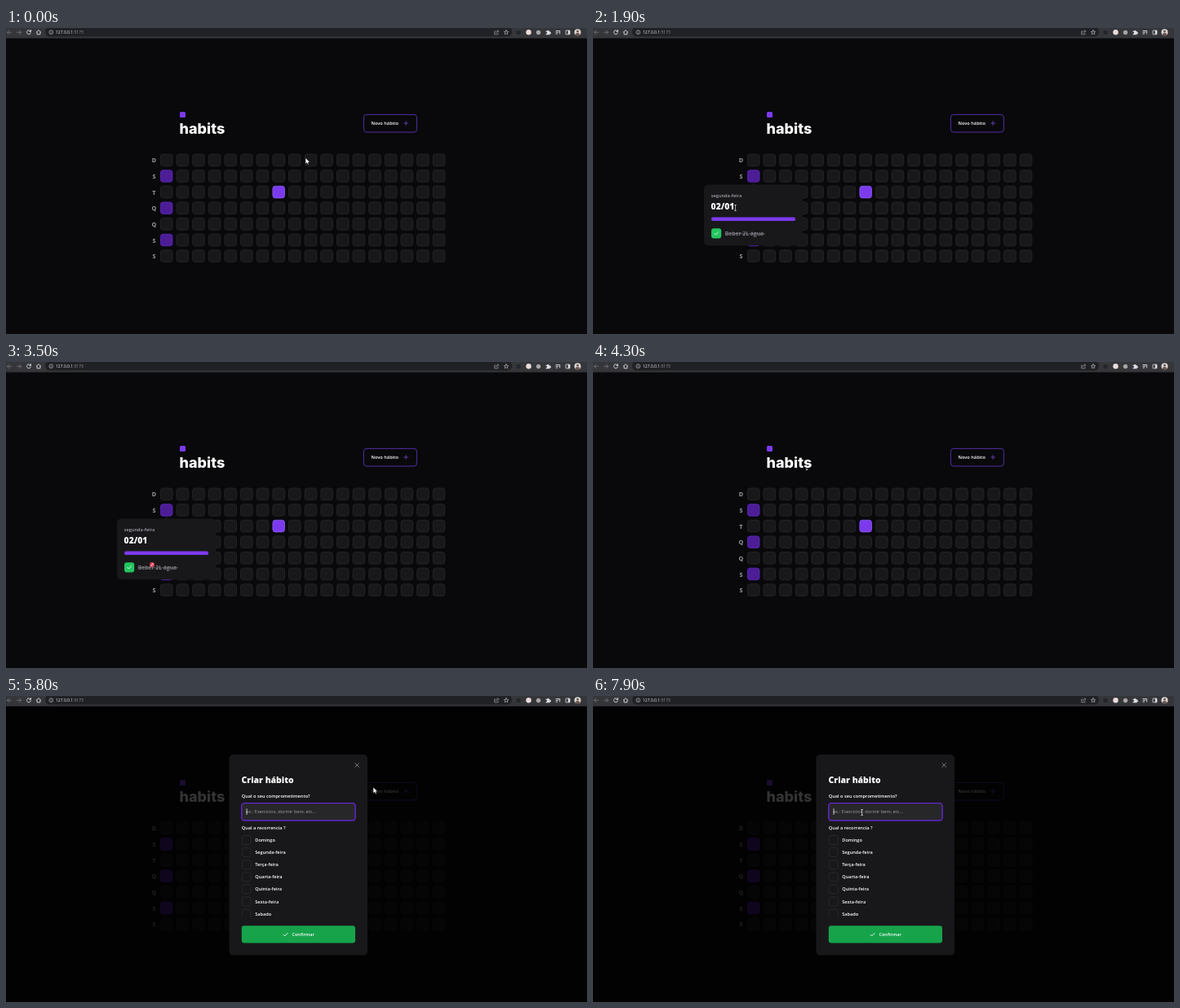
An HTML page that plays this animation: 712x376 px, repeating every 8000 ms.

```html
<!DOCTYPE html>
<html lang="pt">
<head>
<meta charset="utf-8">
<title>habits</title>
<style>
html, body { margin: 0; width: 100%; height: 100%; overflow: hidden; background: #09090b; }
svg { display: block; width: 712px; height: 376px; font-family: "Open Sans", sans-serif; }
text { white-space: pre; }
</style>
</head>
<body>
<svg id="stage" viewBox="0 0 712 376"></svg>
<script>
const text = (x, y, size, weight, fill, str, extra = '') =>
  `<text x="${x}" y="${y}" font-size="${size}" font-weight="${weight}" fill="${fill}" ${extra}>${str}</text>`;
const box = (x, y, w, h, r, fill, stroke = 'none', sw = 0.8, id = '') =>
  `<rect x="${x}" y="${y}" width="${w}" height="${h}" rx="${r}" fill="${fill}" stroke="${stroke}" stroke-width="${sw}" id="${id}"/>`;
const line = (d, stroke, sw = 0.9) =>
  `<path d="${d}" fill="none" stroke="${stroke}" stroke-width="${sw}" stroke-linecap="round" stroke-linejoin="round"/>`;
const dot = (x, y, r, fill, stroke = 'none') =>
  `<circle cx="${x}" cy="${y}" r="${r}" fill="${fill}" stroke="${stroke}" stroke-width=".7"/>`;
const group = (id, body) => `<g id="${id}">${body}</g>`;

function browserBar() {
  const light = '#dcdde0', dim = '#77797d';
  return box(0, 0, 712, 12.6, 0, '#35363a') +
    box(48, -1, 572, 11.6, 5.5, '#202124') +
    line('M6.5 5.3H1.5M3.7 3L1.4 5.3L3.7 7.6', dim, 0.8) +
    line('M13.5 5.3H18.5M16.3 3L18.6 5.3L16.3 7.6', dim, 0.8) +
    line('M30 3.7A2.5 2.5 0 1 0 30.4 6M30.5 2.6V4.4H28.7', light) +
    line('M37.3 5.2L40 2.7L42.7 5.2M38.1 5V7.8H41.9V5', light) +
    dot(55.3, 5.2, 2.4, 'none', '#b5b7ba') + line('M55.3 5V6.5M55.3 3.8V3.9', '#b5b7ba', 0.6) +
    text(61, 7.1, 5, 400, '#e8eaed', '127.0.0.1<tspan fill="#96999e">:5173</tspan>') +
    line('M600 4H598.6V7.8H603V6.4M600.3 6C600.5 4.5 601.5 3.9 603.5 3.9M602.3 2.5L603.7 3.9L602.3 5.3', '#b5b7ba', 0.6) +
    line('M613 2.5L613.8 4.4L615.8 4.5L614.2 5.8L614.8 7.8L613 6.7L611.2 7.8L611.8 5.8L610.2 4.5L612.2 4.4Z', '#c4c6ca', 0.6) +
    box(625.5, 3, 5, 5, 0.8, '#24262b') +
    dot(640.5, 5.3, 3.2, '#ecdcda') +
    dot(652.5, 5.5, 2.7, '#a9a5a4') +
    `<path d="M661.6 3.8H663.2A1 1 0 1 1 665.2 3.8H666.6V5.2A1 1 0 1 1 666.6 7.1V8.3H661.6V6.9A1 1 0 1 0 661.6 5.1Z" fill="${light}"/>` +
    line('M674 3.5H678M674 5.3H677M674 7.1H675.6M678.7 3.5V7', light) +
    box(686, 3, 5, 4.8, 0.5, 'none', light) + box(688.8, 3, 2.2, 4.8, 0, light) +
    dot(700.5, 5.3, 4, '#d8d6d5') + dot(700.5, 4.2, 1.4, '#6b5148') +
    '<path d="M697.6 8A3 2.8 0 0 1 703.4 8A4 4 0 0 1 697.6 8Z" fill="#6b5148"/>';
}

function page() {
  const step = 19.64;
  let out = box(213, 103, 7, 7, 1.5, '#7c3aed') +
    text(212.6, 130.3, 18, 800, '#fff', 'habits', 'font-family="Inter, sans-serif"') +
    box(438.4, 106.4, 65, 21.6, 3.5, '#09090b', '#5b33b8', 0.9, 'newButton') +
    text(447.6, 119.2, 5.65, 600, '#fff', 'Novo hábito') +
    line('M487.6 117H492.6M490.1 114.5V119.5', '#7c4fe0', 0.7);
  [...'DSTQQSS'].forEach((day, row) => {
    const y = 155 + row * step;
    out += text(181.4, y + 10.4, 7.2, 700, '#a1a1aa', day, 'text-anchor="middle"');
    for (let col = 0; col < 18; col++) {
      let colours = ['#18181b', '#29292c'];
      if (!col && row % 2) colours = ['#4c1d95', '#6428c8'];
      if (col == 7 && row == 2) colours = ['#7c3aed', '#8b5cf6'];
      out += box(189.4 + col * step, y, 14.6, 14.6, 3.2, ...colours);
    }
  });
  return out;
}

const popover = () =>
  '<path d="M193.5 193L196.7 189.8L200 193Z" fill="#18181b"/>' +
  box(136, 192.4, 121, 74.8, 5.5, '#18181b') +
  text(144.8, 208.3, 5.65, 600, '#a1a1aa', 'segunda-feira') +
  text(144.6, 223.2, 10.3, 800, '#fff', '02/01') +
  box(145, 232.6, 103, 4.5, 2.2, '#7c3aed') +
  box(145, 246.2, 12.2, 12.2, 3, '#22c55e') +
  line('M148.8 252.5L150.4 254.1L153.6 250.7', '#fff', 0.8) +
  text(161.8, 255, 6.9, 600, '#8c8c94', 'Beber 2L água') +
  line('M162 252.8H210.5', '#8c8c94', 0.6);

function modal() {
  const days = ['Domingo', 'Segunda-feira', 'Terça-feira', 'Quarta-feira', 'Quinta-feira', 'Sexta-feira', 'Sabado'];
  const options = days.map((day, i) => {
    const y = 177 + i * 15.1;
    return box(289.3, y - 5.5, 11, 11, 2.8, '#18181b', '#2c2c30') + text(305.3, y + 2, 5.6, 600, '#fff', day);
  }).join('');
  return '<rect y="12.6" width="712" height="364" fill="#000" opacity=".8"/>' +
    box(273.5, 72, 169.5, 246.6, 5, '#18181b') +
    line('M427.9 82.7L432.5 87.3M432.5 82.7L427.9 87.3', '#a1a1aa', 0.7) +
    text(288.6, 107.4, 10.4, 800, '#fff', 'Criar hábito') +
    text(288.8, 125.4, 5.63, 600, '#fff', 'Qual o seu comprometimento?') +
    box(288.7, 131.6, 139.4, 21.4, 3.5, '#27272a', '#6326cc', 1.4) +
    text(294.3, 144.1, 5.65, 400, '#a1a1aa', 'ex.: Exercícios, dormir bem, etc...') +
    group('caret', line('M295 138.7V145.6', '#fff', 0.7)) +
    text(288.8, 164.4, 5.6, 600, '#fff', 'Qual a recorrencia ?') +
    `<clipPath id="list"><rect x="280" y="168" width="155" height="104"/></clipPath><g clip-path="url(#list)">${options}</g>` +
    box(288.8, 282.2, 139.2, 21.3, 3.2, '#16a34a') +
    line('M340 293.2L341.7 294.9L345.2 291.3', '#fff') +
    text(350.4, 295, 5.6, 600, '#fff', 'Confirmar');
}

const pointers = {
  arrow: '<path d="M0 0V7.6L1.8 6L3 8.6L4.2 8L3.1 5.5H5.5Z" fill="#fff" stroke="#000" stroke-width=".5"/>',
  hand: '<path d="M-1 .5Q0-.6 1 .5V3.5L4 4.2Q5 4.6 4.8 6L4 9.5H-.8L-3 6.2Q-2.8 4.8-1 6Z" fill="#fff" stroke="#000" stroke-width=".5"/>',
  beam: line('M-1-3.4H1M0-3.4V3.4M-1 3.4H1', '#ddd', 0.7),
  denied: dot(0, 0, 2.7, '#fff') + '<path d="M-1.7-1.7L1.7 1.7M2.4 0A2.4 2.4 0 1 1-2.4 0A2.4 2.4 0 1 1 2.4 0" fill="none" stroke="#d3203a" stroke-width="1.2"/>'
};

// time, x, y, and the pointer shape from then on
const path = [
  [0, 367, 159.5, 'arrow'], [200, 345, 118], [400, 285, 86], [600, 226, 112], [800, 193, 172, 'hand'],
  [900, 196, 180], [1400, 196, 180], [1600, 187, 198, 'arrow'], [1800, 180, 212, 'beam'],
  [2000, 169, 230, 'arrow'], [2200, 151, 253, 'denied'], [2300, 156, 254], [2400, 157, 254],
  [2900, 157, 254], [3200, 152, 257], [3500, 179, 249], [3600, 188, 243, 'arrow'], [3800, 212, 216],
  [4100, 246, 155], [4300, 262, 129, 'beam'], [4400, 262, 129], [4500, 280, 136, 'arrow'],
  [4700, 350, 145], [4900, 425, 128], [5100, 450, 112], [6100, 450, 112], [6300, 428, 142],
  [6500, 382, 157], [6700, 345, 150, 'beam'], [6900, 329, 143], [7300, 329, 143], [7400, 329.6, 143]
];

function pointerAt(t) {
  let i = path.length - 1;
  while (path[i][0] > t) i--;
  const a = path[i], b = path[i + 1] || a;
  const k = b === a ? 0 : (t - a[0]) / (b[0] - a[0]);
  const shape = path.slice(0, i + 1).reverse().find(key => key[3])[3];
  return { x: a[1] + (b[1] - a[1]) * k, y: a[2] + (b[2] - a[2]) * k, shape };
}

const stage = document.getElementById('stage');
stage.innerHTML = page() +
  group('focusRing', box(437.6, 105.6, 66.6, 23.2, 4.2, 'none', '#6d28d9', 1.8)) +
  group('popover', popover()) + group('modal', modal()) + browserBar() +
  group('pointer', Object.keys(pointers).map(name => group(name, pointers[name])).join(''));

const get = id => document.getElementById(id);
const show = (id, on) => get(id).setAttribute('display', on ? 'inline' : 'none');
const between = (t, from, to) => t >= from && t < to;

function draw(now) {
  const t = Math.floor(now % 8000 / 100) * 100;
  const { x, y, shape } = pointerAt(t);
  get('pointer').setAttribute('transform', `translate(${x} ${y})`);
  for (const name in pointers) show(name, name === shape);
  show('popover', between(t, 1100, 4000));
  show('focusRing', between(t, 5600, 5800));
  show('modal', t >= 5800);
  show('caret', t < 6400 || between(t, 6900, 7400) || t >= 7900);
  get('newButton').setAttribute('stroke', between(t, 5000, 5600) ? '#a78bfa' : '#5b33b8');
}

const start = performance.now();
function frame() {
  draw(performance.now() - start);
  requestAnimationFrame(frame);
}
frame();
</script>
</body>
</html>
```
